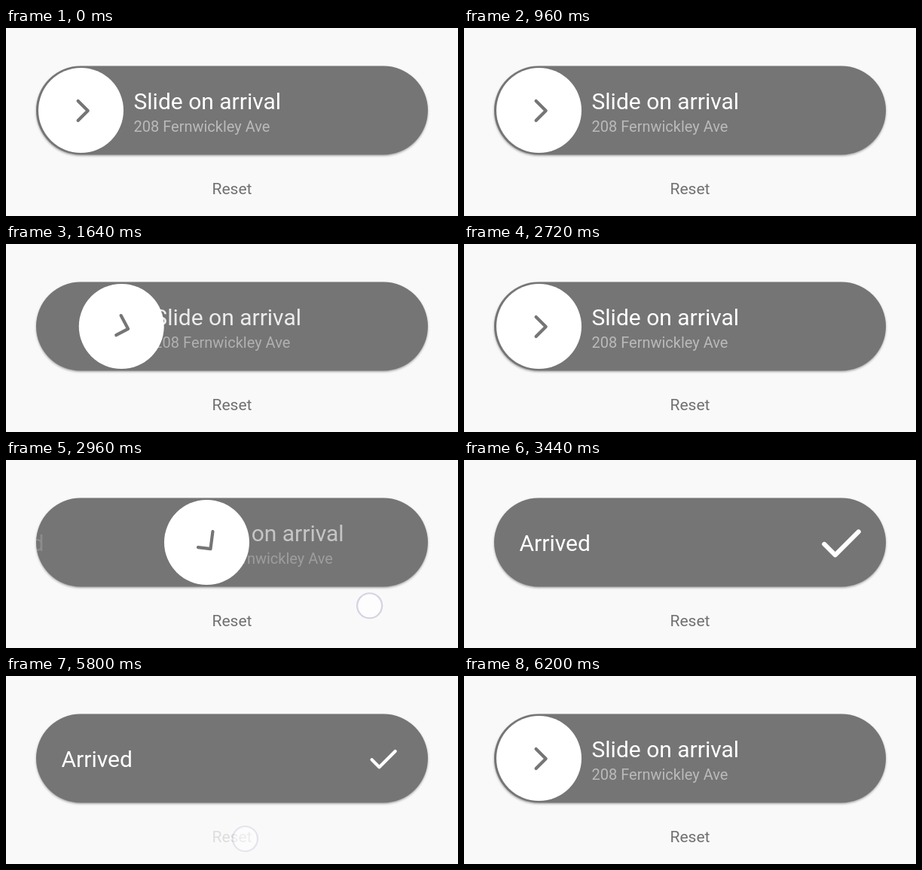
These frames come from a looping animation (600 px wide and 250 px high, 7400 ms). An HTML page with a canvas:

```html
<!DOCTYPE html>
<html lang="en">
<head>
<meta charset="utf-8">
<title>Slide on arrival</title>
<style>
  html, body { margin: 0; width: 100%; height: 100%; overflow: hidden; background: #f9f9f9; }
  canvas { display: block; width: 600px; height: 250px; }
</style>
</head>
<body>
<canvas id="stage" width="600" height="250"></canvas>
<script>
const ctx = document.getElementById('stage').getContext('2d');
const LOOP = 7400;
const GREY = 117;
const TRAVEL = 402;
const PULL = 192;
const KNOB = { x: 99.5, y: 109.5, r: 56.5 };

// Moments at which each action begins.
const TRY = 1120, SLIDE = 2720, PRESS = 4150, RELEASE = 5800;

const smooth = u => u * u * (3 - 2 * u);
const cubicIn = u => u ** 3;
const quadOut = u => 1 - (1 - u) ** 2;

// Eased progress from 0 to 1, held before and after.
const ramp = (t, begin, duration, ease = smooth) =>
  ease(Math.min(1, Math.max(0, (t - begin) / duration)));

function knobOffset(t) {
  const attempt = ramp(t, TRY, 375, cubicIn) - ramp(t, TRY + 375, 310, quadOut);
  const slide = ramp(t, SLIDE, 323, cubicIn) - ramp(t, RELEASE + 60, 330);
  return PULL * attempt + TRAVEL * slide;
}

const knobAlpha = t => 1 - ramp(t, SLIDE + 400, 180) + ramp(t, RELEASE + 40, 120);
const iconScale = t => 1 + 0.46 * (ramp(t, SLIDE + 500, 210) - ramp(t, SLIDE + 800, 170));
const resetAlpha = t => 1 - 0.8 * (ramp(t, PRESS, 130) - ramp(t, RELEASE + 20, 260));

const touches = [
  { begin: TRY, end: TRY + 310, x: 105, y: 165, dx: 187, dy: 15 },
  { begin: SLIDE, end: SLIDE + 300, x: 105, y: 165, dx: 420, dy: 32 },
  { begin: PRESS - 450, end: RELEASE, x: 317.5, y: 216.5, dx: 0, dy: 0 },
];

function text(label, size, x, y, color, alpha, align = 'left') {
  ctx.globalAlpha = Math.max(0, alpha);
  ctx.font = `${size}px Roboto, sans-serif`;
  ctx.textAlign = align;
  ctx.fillStyle = color;
  ctx.fillText(label, x, y);
  ctx.globalAlpha = 1;
}

function disc(x, y, r, color) {
  ctx.beginPath();
  ctx.arc(x, y, r, 0, 2 * Math.PI);
  ctx.fillStyle = color;
  ctx.fill();
}

function pillPath() {
  ctx.beginPath();
  ctx.roundRect(40, 50.5, 520, 118, 59);
}

// Chevron that turns into a check mark as progress goes from 0 to 1.
function icon(x, y, progress, scale, shade) {
  const p2 = progress * progress;
  const tipX = 9.2 + 2 * p2, tipY = 6 * p2;
  const long = (18.5 + 11.5 * progress) * Math.SQRT1_2;
  const short = (18.5 - 4.5 * progress) * Math.SQRT1_2;
  ctx.save();
  ctx.translate(x, y);
  ctx.scale(scale, scale);
  ctx.rotate(Math.min(progress * 0.7, 0.5) * Math.PI);
  ctx.beginPath();
  ctx.moveTo(tipX - long, tipY - long);
  ctx.lineTo(tipX, tipY);
  ctx.lineTo(tipX - short, tipY + short);
  ctx.lineWidth = 4.2;
  ctx.lineCap = ctx.lineJoin = 'round';
  ctx.strokeStyle = `rgb(${shade}, ${shade}, ${shade})`;
  ctx.stroke();
  ctx.restore();
}

function drawSlider(t) {
  const offset = knobOffset(t), progress = offset / TRAVEL;
  const visible = knobAlpha(t);

  ctx.save();
  ctx.shadowColor = 'rgba(0, 0, 0, 0.35)';
  ctx.shadowBlur = 3;
  ctx.shadowOffsetY = 1.5;
  pillPath();
  ctx.fillStyle = `rgb(${GREY}, ${GREY}, ${GREY})`;
  ctx.fill();
  ctx.restore();

  ctx.save();
  pillPath();
  ctx.clip();
  text('Slide on arrival', 30, 169.5 + offset / 2, 108, '#fff', 1 - progress);
  text('208 Fernwickley Ave', 20, 169.5 + offset / 2, 137.5, '#bababa', 1 - progress);
  text('Arrived', 30, 73.5 + (offset - TRAVEL) / 2, 121, '#fff', progress ** 2);
  disc(KNOB.x + offset, KNOB.y, KNOB.r, `rgba(255, 255, 255, ${visible})`);
  icon(KNOB.x + offset, KNOB.y + 0.5, progress, iconScale(t),
    Math.round(255 - (255 - GREY) * visible));
  ctx.restore();
}

function drawTouch({ begin, end, x, y, dx, dy }, t) {
  const moved = ramp(t, begin, end - begin);
  ctx.globalAlpha = ramp(t, begin, 100) - ramp(t, end - 100, 200);
  disc(x + dx * moved, y + dy * moved, 16.5, 'rgba(255, 255, 255, 0.85)');
  ctx.lineWidth = 2.2;
  ctx.strokeStyle = 'rgba(120, 122, 170, 0.34)';
  ctx.stroke();
  ctx.globalAlpha = 1;
}

function draw(t) {
  ctx.fillStyle = '#f9f9f9';
  ctx.fillRect(0, 0, 600, 250);
  drawSlider(t);
  text('Reset', 21, 300, 221, '#707070', resetAlpha(t), 'center');
  touches.filter(({ begin, end }) => t > begin && t < end + 100)
    .forEach(touch => drawTouch(touch, t));
}

const start = performance.now();
function frame() {
  draw((performance.now() - start) % LOOP);
  requestAnimationFrame(frame);
}
frame();
</script>
</body>
</html>
```
